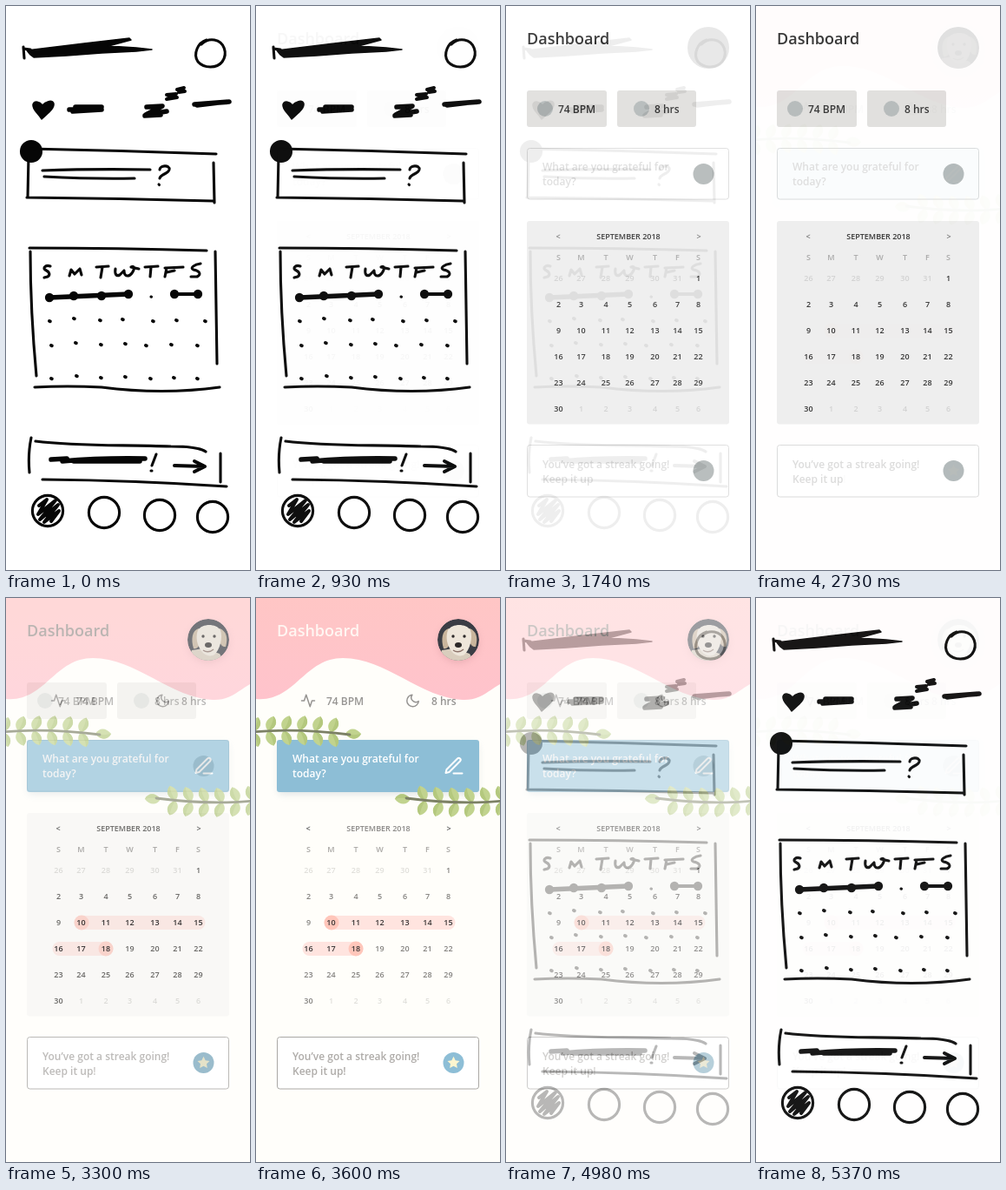
An HTML page that plays this animation: 281 by 648 pixels, repeating every 5.4 s.

```html
<!DOCTYPE html>
<html lang="en">
<head>
<meta charset="utf-8">
<title>Dashboard: sketch, wireframe, design</title>
<style>
html, body { margin: 0; width: 100%; height: 100%; overflow: hidden; background: #fff; }
svg { display: block; width: 281px; height: 648px; }
text { font-family: "Open Sans", sans-serif; font-weight: 600; }
.ink { fill: none; stroke: #060606; stroke-width: 3.1; stroke-linecap: round; stroke-linejoin: round; }
.ink .solid { fill: #060606; stroke-width: 1.5; }
.ink .fat { stroke-width: 5.6; }
.ink .mid { stroke-width: 4; }
.icon { fill: none; stroke-linecap: round; stroke-linejoin: round; }
</style>
</head>
<body>
<svg id="stage" viewBox="0 0 281 648">
  <defs>
    <linearGradient id="pink" x1="0" y1="0" x2="0" y2="1">
      <stop offset="0" stop-color="#ffc6c5"/><stop offset="1" stop-color="#ffc3cc"/>
    </linearGradient>
    <filter id="soft" x="-20%" y="-40%" width="140%" height="190%"><feGaussianBlur stdDeviation="4"/></filter>
    <clipPath id="face"><circle cx="233" cy="48" r="24"/></clipPath>
  </defs>
  <g id="sketch"></g>
  <g id="wire"></g>
  <g id="design"></g>
</svg>
<script>
const $ = id => document.getElementById(id);
const path = (d, cls = '') => `<path class="${cls}" d="${d}"/>`;
const shape = (d, fill) => `<path fill="${fill}" d="${d}"/>`;
const dot = (x, y, r, fill) => `<circle cx="${x}" cy="${y}" r="${r}" fill="${fill}"/>`;
const box = (x, y, w, h, fill, extra = '') =>
  `<rect x="${x}" y="${y}" width="${w}" height="${h}" fill="${fill}" ${extra}/>`;
const label = (s, x, y, size, fill, extra = '') =>
  `<text x="${x}" y="${y}" font-size="${size}" fill="${fill}" ${extra}>${s}</text>`;
const page = fill => box(0, 0, 281, 648, fill);

function sketch() {
  const dotRows = [
    [360, 50, 78, 108, 134, 169, 196, 229],
    [388, 52, 80, 109, 137, 161, 190, 220],
    [426, 52, 81, 109, 137, 166, 193, 220]
  ];
  const dots = dotRows.map(([y, ...xs]) =>
    xs.map((x, i) => path(`M${x} ${y + [2, -1, 1, 0, 2, 1, 2][i]}l.8 .3`, 'mid')).join('')).join('');
  const beads = [[50, 335], [78, 333], [110, 333], [141, 331], [194, 331], [221, 331]]
    .map(([x, y]) => dot(x, y, 3.6, '#060606')).join('');
  const rings = [[48, 580], [113, 582], [177, 585], [238, 587]]
    .map(([x, y]) => `<circle cx="${x}" cy="${y}" r="17.6"/>`).join('');
  return page('#fff') + '<g class="ink">' +
    // header
    path('M20 47L21 60M20 49L28 50') +
    path('M24 51L90 43L142 37L144 39L118 46L150 48L168 50L150 52L110 54L70 57L32 59L28 56Z', 'solid') +
    path('M231 39C221 42 215 55 221 64C228 72 243 72 249 64C256 54 251 41 240 39C234 38 229 40 225 44') +
    // vitals
    path('M41 130C37 123 30 119 31 113C33 108 39 110 42 114C45 110 53 107 55 112C56 118 47 124 41 130Z', 'solid') +
    path('M73 119L108 117M77 121L110 119M80 116L110 116', 'fat') +
    path('M162 116L180 115L161 125L185 121M160 126L178 125', 'fat') +
    path('M185 102L196 101L185 107L197 105M197 96L205 94L199 99L206 98', 'mid') +
    path('M217 113L257 110M220 114L245 111', 'fat') +
    // question card
    dot(29, 167, 11.5, '#060606') +
    path('M28 164Q130 166 242 170M26 172L25 220M24 220Q130 221 238 224M239 180L240 226') +
    path('M42 189Q100 187 166 188M44 196Q100 199 148 198') +
    path('M177 188C177 183 189 182 188 188C187 193 178 193 177 198M176 205L176.5 205.5') +
    // calendar
    path('M27 278Q130 278 231 281M28 282Q28 350 35 425M33 438Q70 436 110 438Q180 447 246 438M241 282L243 411') +
    path('M51 299C46 297 42 301 45 303C49 305 52 308 48 311L44 312') +
    path('M73 310L75 303L79 308L85 302L87 309M104 300L118 299M111 300L109 312') +
    path('M126 302C125 308 127 311 131 309L136 304C136 312 142 311 145 307C149 301 148 298 144 300L153 302') +
    path('M160 300L175 299M167 300L166 311') +
    path('M185 301L183 311M183 301L204 300M185 306L194 304M224 296C217 297 211 301 216 303C222 304 226 308 220 311L213 311') +
    path('M50 335L141 331', 'fat') + path('M194 331L221 331', 'mid') + beads + path('M167 334l.5 .2') + dots +
    // bottom card
    path('M29 496Q25 515 27 536M34 500C80 506 130 504 190 506Q222 506 230 512M42 544Q150 545 254 552M247 514L247 547') +
    path('M52 521L70 520M65 523Q110 519 160 520M78 523L154 523', 'fat') +
    path('M173 515L168 528M167 534L168 534') +
    path('M194 528L228 529M217 523L229 529L217 535', 'mid') +
    // tabs
    rings +
    path('M38 574L47 567L37 584L57 568L39 590L60 573L44 593L61 580L52 592', 'mid') +
    '</g>';
}

const cols = [60.5, 86.5, 115, 142.5, 171.5, 197.5, 221.5];
const mid = 'text-anchor="middle"';

// "ink" gives the colour of a day of the month
function calendar(title, arrow, week, muted, ink) {
  let s = label('&lt;', 60, 268, 9, arrow, mid) + label('&gt;', 222, 268, 9, arrow, mid) +
    label('SEPTEMBER 2018', 141, 268, 9, title, mid);
  cols.forEach((x, i) => s += label('SMTWTFS'[i], x, 292, 9, week, mid));
  for (let i = 0; i < 42; i++) {
    const day = i - 5, inside = day > 0 && day < 31;
    const shown = day < 1 ? day + 31 : day > 30 ? day - 30 : day;
    s += label(shown, cols[i % 7], 316 + 30 * Math.floor(i / 7), 9, inside ? ink(day) : muted, mid);
  }
  return s;
}

const question = fill => label('What are you grateful for', 42, 189, 12, fill) + label('today?', 42, 205.5, 12, fill);
const praise = (fill, end) => label('You’ve got a streak going!', 42, 531, 12, fill) + label('Keep it up' + end, 42, 547.5, 12, fill);

function wire() {
  const grey = '#b5baba', edge = 'rx="3" stroke="#dedede"';
  return page('#fff') +
    label('Dashboard', 24, 43.5, 18, '#333') + dot(233, 48, 24, '#e7e7e7') +
    box(24, 97, 92, 42, '#e0dfdd', 'rx="3"') + box(128, 97, 91, 42, '#e0dfdd', 'rx="3"') +
    dot(45, 118, 9, grey) + dot(156, 118, 9, grey) +
    label('74 BPM', 60, 122.5, 12, '#333') + label('8 hrs', 171, 122.5, 12, '#333') +
    box(24.5, 163.5, 232, 58.5, '#fff', edge) + question('#dedede') + dot(227.5, 193, 12, grey) +
    box(24, 247, 233, 233.5, '#eee', 'rx="3"') + calendar('#333', '#777', '#aaa', '#d2d2d2', () => '#333') +
    box(24.5, 504.5, 232, 59.5, '#fff', edge) + praise('#dedede', '') + dot(227.5, 534, 12, grey);
}

function branch(transform) {
  const leaf = (x, y, flip, turn) =>
    `<g transform="translate(${x} ${y}) scale(1 ${flip}) rotate(${turn})">` +
    shape('M0 0C-7-5-6-13 2-18C9-13 8-5 0 0Z', '#c1d38e') +
    shape('M0 0C2-6 3-12 2-18C9-13 8-5 0 0Z', '#b4c87e') + '</g>';
  let s = '';
  for (let i = 0; i < 6; i++) {
    const x = -4 + 18 * i, t = (x + 4) / 112;
    const y = 154 * (1 - t) ** 2 + 298 * t * (1 - t) + 157 * t * t;
    s += leaf(x, y, 1, 14) + leaf(x, y, -1, 14);
  }
  s += leaf(103, 156, 1, 84);
  return `<g transform="${transform}">${s}<path d="M-4 154Q45 149 108 157" fill="none" stroke="#7c8165" stroke-width="2.8" stroke-linecap="round"/></g>`;
}

function design() {
  const blue = '#8dbed6', grey = '#969492';
  const icon = (x, y, k, stroke, d) =>
    `<g class="icon" transform="translate(${x} ${y}) scale(${k})" stroke="${stroke}" stroke-width="2">${path(d)}</g>`;
  const dog = '<g clip-path="url(#face)">' + dot(233, 48, 24, '#3b3d45') +
    shape('M209 74L214 60L228 58L246 64L252 75Z', '#d9cdbd') +
    shape('M222 35C214 37 213 48 216 58C222 60 225 50 225 40ZM246 35C254 38 256 46 253 56C247 57 245 48 243 40Z', '#c9b59c') +
    shape('M221 37C226 29 242 29 247 37C250 46 246 60 240 65C235 68 229 66 225 61C220 54 218 45 221 37Z', '#eee6da') +
    dot(227, 44, 1.7, '#2c2928') + dot(240, 44, 1.7, '#2c2928') +
    '<ellipse cx="233" cy="54" rx="4" ry="3" fill="#2c2928"/>' +
    '<path d="M227 60Q233 64 239 59" fill="none" stroke="#8b7168" stroke-width="1.5"/></g>';
  return page('#fffefa') +
    shape('M0 0H281V99C268 106 258 118 238 117C190 115 150 69 100 69C55 69 45 120 0 116Z', 'url(#pink)') +
    label('Dashboard', 24, 43.5, 18, '#fff6f2') +
    '<circle cx="233" cy="51" r="23" fill="#b87880" opacity=".3" filter="url(#soft)"/>' + dog +
    icon(51, 109, .75, grey, 'M22 12H18L15 21L9 3L6 12H2') +
    label('74 BPM', 81, 122.5, 12, grey) +
    icon(171.5, 109, .75, grey, 'M21 12.79A9 9 0 1 1 11.21 3A7 7 0 0 0 21 12.79Z') +
    label('8 hrs', 202, 122.5, 12, grey) +
    box(26, 168, 229, 57, '#7d98a5', 'rx="3" opacity=".28" filter="url(#soft)"') +
    box(24, 163, 233, 60, blue, 'rx="3"') + question('#fff') +
    icon(215.5, 181, 1, '#fff', 'M12 20.5H22M16.5 3.5A2.12 2.12 0 0 1 19.5 6.5L7 19L3 20L4 16Z') +
    branch('') + branch('translate(281 387) rotate(180)') +
    box(78.5, 365, 151, 16, '#ffe4df', 'rx="8"') + box(53.5, 395, 70, 16, '#ffe4df', 'rx="8"') +
    dot(87, 373, 8.5, '#ffc6ba') + dot(115, 403, 8.5, '#ffc6ba') +
    calendar('#8a8886', '#555', '#a9a7a4', '#e0dfda', d => d > 9 && d < 19 ? '#3a3636' : '#83817e') +
    box(24.5, 504.5, 232, 59.5, '#fff', 'rx="3" stroke="#aaa8a5"') + praise('#aeaba8', '!') +
    dot(227.5, 534, 12, blue) +
    '<g transform="translate(219.1 525.4) scale(.7)">' +
    shape('M12 2L15.1 8.3L22 9.3L17 14.1L18.2 21L12 17.8L5.8 21L7 14.1L2 9.3L8.9 8.3Z', '#fdf6cf') + '</g>';
}

$('sketch').innerHTML = sketch();
$('wire').innerHTML = wire();
$('design').innerHTML = design();

const LOOP = 5400, PART = 1800, FADE = 900, STEP = 30;
const ramp = (t, start) => Math.min(1, Math.max(0, (t - start) / FADE));

function draw(now) {
  const t = Math.floor((now % LOOP) / STEP + 1e-6) * STEP;
  // both upper layers fade away together at the end of the loop
  const out = 1 - ramp(t, 2 * PART + FADE);
  $('wire').setAttribute('opacity', ramp(t, FADE) * out);
  $('design').setAttribute('opacity', ramp(t, PART + FADE) * out);
}

let start;
function tick(now) {
  start ??= now;
  draw(now - start);
  requestAnimationFrame(tick);
}
draw(0);
requestAnimationFrame(tick);
</script>
</body>
</html>
```
